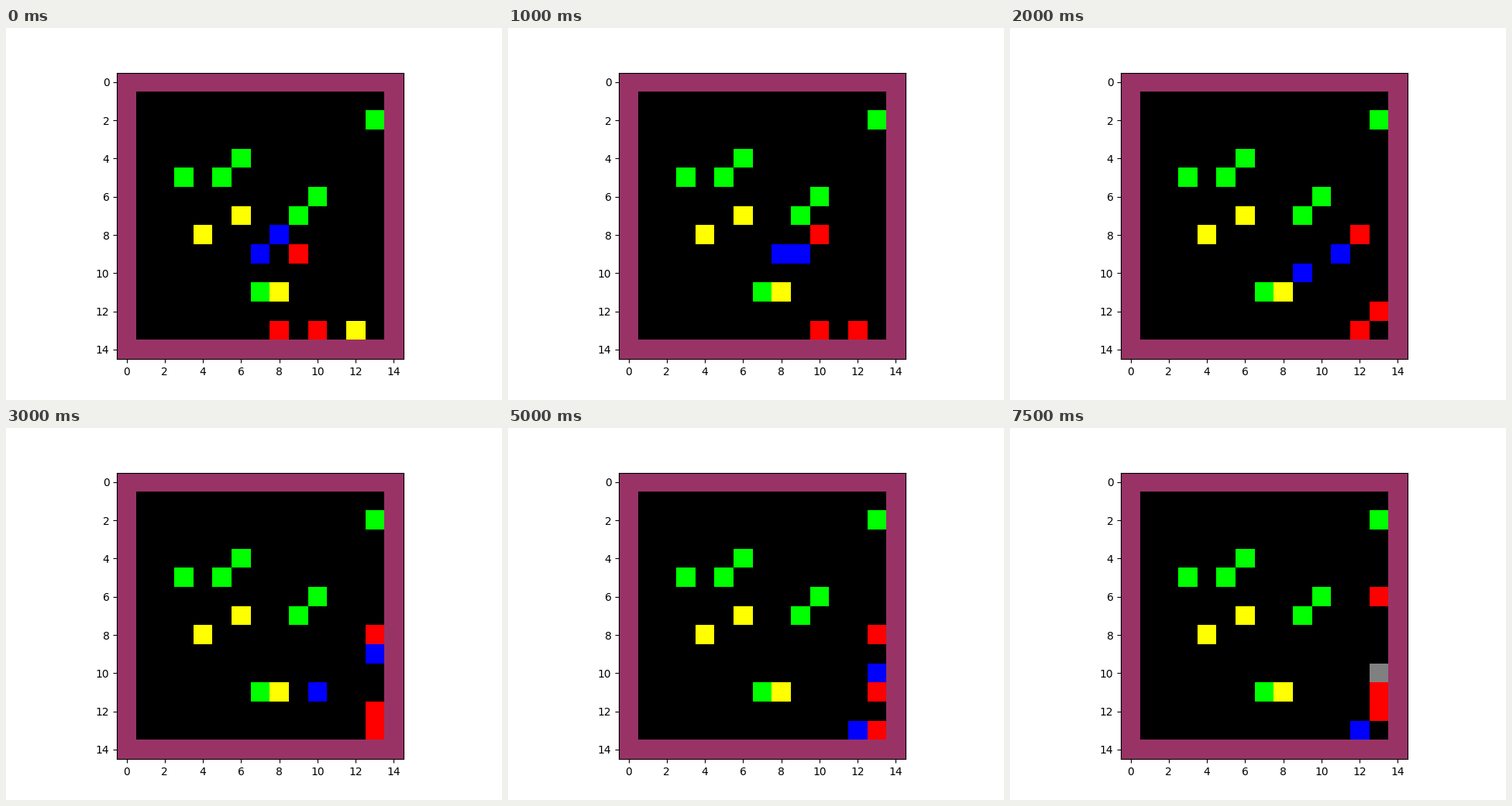
A matplotlib script for the animation above (8000 ms loop, 640 by 480 pixels).

```python
import numpy as np
import matplotlib.pyplot as plt
from matplotlib.animation import FuncAnimation

SIZE = 15
FRAMES = 16
INTERVAL = 500

WALL = (153, 51, 102)
GREEN = (0, 255, 0)
YELLOW = (255, 255, 0)
RED = (255, 0, 0)
BLUE = (0, 0, 255)
GRAY = (128, 128, 128)

# Cells are (column, row).
PLANTS = [(13, 2), (6, 4), (3, 5), (5, 5), (10, 6), (9, 7), (7, 11)]
FOOD = [(6, 7), (4, 8), (8, 11), (12, 13)]

STEP = {".": (0, 0), "R": (1, 0), "U": (0, -1), "D": (0, 1)}

# Start cell, one move per frame, colour, frame of death
AGENTS = [
    ((9, 9), "URRRR.....U...U", RED, None),
    ((8, 13), "RRRRR.........U", RED, None),
    ((10, 13), "RRUR....U......", RED, None),
    ((7, 9), "RRRRRR...D.....", BLUE, 12),
    ((8, 8), ".DDRRDDDRR.....", BLUE, None),
]


def position(start, moves, frame):
    x, y = start
    for move in moves[:frame]:
        dx, dy = STEP[move]
        x, y = x + dx, y + dy
    return x, y


def paint(grid, cells, color):
    for x, y in cells:
        grid[y, x] = color


def world(frame):
    grid = np.zeros((SIZE, SIZE, 3), dtype=np.uint8)
    grid[[0, -1], :] = WALL
    grid[:, [0, -1]] = WALL
    paint(grid, PLANTS, GREEN)

    # Food disappears once any agent has stepped on it.
    visited = {position(start, moves, k)
               for start, moves, _, _ in AGENTS for k in range(frame + 1)}
    paint(grid, [cell for cell in FOOD if cell not in visited], YELLOW)

    for start, moves, color, death in AGENTS:
        dead = death is not None and frame >= death
        paint(grid, [position(start, moves, frame)], GRAY if dead else color)
    return grid


fig, ax = plt.subplots(figsize=(6.4, 4.8), dpi=100)
image = ax.imshow(world(0))


def update(frame):
    image.set_data(world(frame))
    return [image]


anim = FuncAnimation(fig, update, frames=FRAMES, interval=INTERVAL,
                     repeat=True, repeat_delay=0)
plt.show()
```
